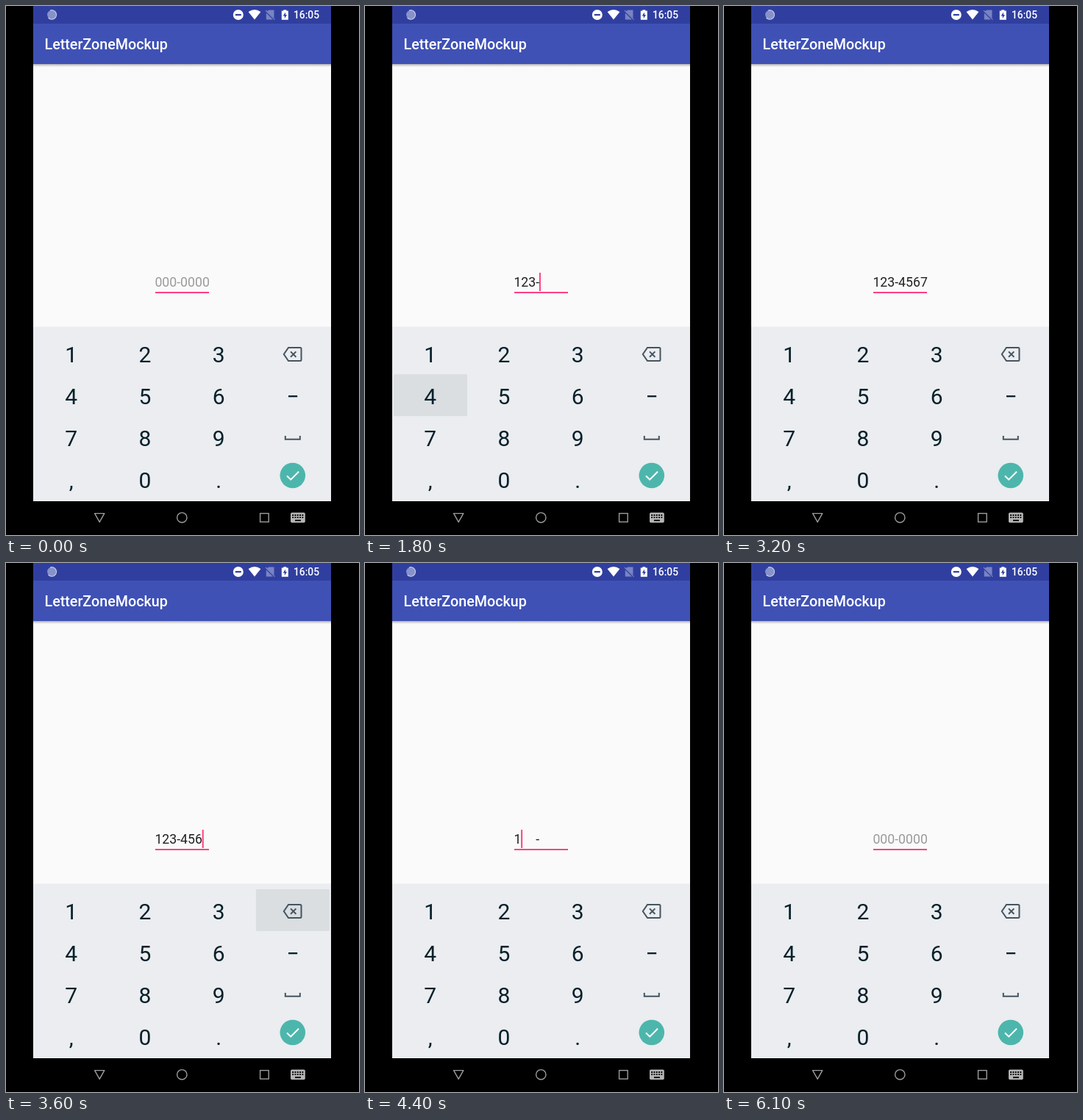
Animation of 480 by 720 pixels, one loop 6.6 s. Source, as an HTML page:

```html
<!DOCTYPE html>
<html lang="en">
<head>
<meta charset="utf-8">
<title>Postcode field</title>
<style>
  html, body { margin: 0; width: 100%; height: 100%; overflow: hidden; background: #000; }
  svg { display: block; width: 480px; height: 720px; }
  text { font-family: Roboto, "Noto Sans", sans-serif; white-space: pre; }
  .key { font-size: 30px; text-anchor: middle; fill: #06202a; }
  .field { font-size: 17.7px; }
  .line { fill: none; }
</style>
</head>
<body>
<svg viewBox="0 0 480 720">
  <defs>
    <linearGradient id="shade" x2="0" y2="1">
      <stop offset="0" stop-color="#000" stop-opacity=".28"/>
      <stop offset="1" stop-color="#000" stop-opacity="0"/>
    </linearGradient>
  </defs>
  <rect width="480" height="720"/>
  <rect x="37" width="405" height="674" fill="#fafafa"/>
  <rect x="37" y="79" width="405" height="4" fill="url(#shade)"/>
  <rect x="37" width="405" height="24.5" fill="#303f9f"/>
  <rect x="37" y="24" width="405" height="55" fill="#3f51b5"/>
  <text x="52.5" y="59" font-size="19.7" font-weight="500" fill="#fff">LetterZoneMockup</text>

  <!-- status bar -->
  <circle cx="62.3" cy="12" r="6.2" fill="#8792cb"/>
  <path class="line" d="M60 6.2A6.2 6.2 0 1 1 57.6 16" stroke="#c3c9e6" stroke-width="1.3"/>
  <circle cx="315.8" cy="12" r="7" fill="#fff"/>
  <rect x="311.8" y="10.9" width="8" height="2.2" fill="#303f9f"/>
  <path d="M338 18.6L329.6 8Q338 1.8 346.4 8Z" fill="#fff"/>
  <path d="M357.5 5.5H364.5V16.5L354 7.5ZM353.8 9.5L363 18.5H353.8Z" fill="#7984c3"/>
  <path class="line" d="M353 6L365.5 18.6" stroke="#7984c3" stroke-width="1.2"/>
  <path d="M377.3 6.5V5.2H381.3V6.5H383.8V18.8H374.8V6.5Z" fill="#fff"/>
  <path d="M380 8.4L376.7 13.4H378.8V17L382 12H380Z" fill="#303f9f"/>
  <text x="391" y="17" font-size="13.8" font-weight="500" fill="#fff">16:05</text>

  <!-- postcode field -->
  <rect x="203" y="389" width="73" height="2" fill="#ff4081"/>
  <text id="head" class="field" x="202.4" y="382.4"/>
  <text id="tail" class="field" x="232.2" y="382.4"/>
  <rect id="caret" y="363" width="2" height="25" fill="#ff4081"/>

  <!-- keypad -->
  <rect x="37" y="436.5" width="405" height="236.5" fill="#ebedf0"/>
  <rect id="press" width="100" height="57" rx="1.5" fill="#dadee1"/>
  <g id="keys"></g>
  <g class="line" stroke="#37474f" stroke-width="2">
    <path d="M384 465H400Q401.5 465 401.5 466.5V481.5Q401.5 483 400 483H384L377.8 474Z" stroke="#455560"/>
    <path d="M387 470.4L394.4 477.8M394.4 470.4L387 477.8" stroke="#455560"/>
    <path d="M384 531.2H396.2" stroke="#06202a" stroke-width="2.3"/>
    <path d="M379.8 585V589.8H399.8V585" stroke="#455560"/>
  </g>
  <circle cx="389.8" cy="639" r="17.3" fill="#4db6ac"/>
  <path class="line" d="M382 639.5L387.2 644.7L398 633.8" stroke="#fff" stroke-width="2"/>

  <!-- navigation bar -->
  <g class="line" stroke="#9c9c9c" stroke-width="1.4">
    <path d="M120.6 690.6H133.8L127.2 702.4Z" stroke-linejoin="round"/>
    <circle cx="239.3" cy="696.3" r="6.7"/>
    <rect x="345.6" y="690.6" width="11.6" height="11.6"/>
  </g>
  <rect x="387" y="689.4" width="19.8" height="13.8" rx="1.8" fill="#b5b5b5"/>
  <g class="line" stroke="#000" stroke-width="1.8">
    <path d="M389.2 693H405M389.2 696.2H405" stroke-dasharray="1.9 1.4"/>
    <path d="M393 700.2H401"/>
  </g>
</svg>
<script>
  const LOOP = 6600, DIGIT = 9.94, DASH = 4.9;
  const $ = id => document.getElementById(id);
  const head = $('head'), tail = $('tail'), caret = $('caret'), press = $('press');

  const colX = c => 39 + c * 100.3;
  const rowY = r => 444 + r * 57.2;
  $('keys').innerHTML = ['123', '456', '789', ',0.'].map((row, r) =>
    [...row].map((ch, c) =>
      `<text class="key" x="${colX(c) + 49.7}" y="${rowY(r) + 40.6}">${ch}</text>`
    ).join('')).join('');

  // [time, digits entered]
  const edits = [
    [900, 1], [1100, 2], [1400, 3], [1900, 4], [2100, 5], [2300, 6], [2700, 7],
    [3500, 6], [3700, 5], [3900, 4], [4000, 3], [4200, 2], [4400, 1], [4600, 0]
  ];
  // [time, column, row], each held for 100 ms
  const presses = [
    [800, 0, 0], [1000, 1, 0], [1300, 2, 0], [1800, 0, 1], [2000, 1, 1], [2200, 2, 1],
    [3400, 3, 0], [3600, 3, 0], [3800, 3, 0], [4100, 3, 0], [4300, 3, 0], [4500, 3, 0]
  ];

  function draw(t) {
    let since = 600, count = 0;
    for (const [at, n] of edits) if (t >= at) [since, count] = [at, n];

    const digits = count ? '1234567'.slice(0, count) : '0000000';
    head.textContent = digits.slice(0, 3);
    tail.textContent = '-' + digits.slice(3);
    const ink = count ? '#212121' : '#9b9b9b';
    head.setAttribute('fill', ink);
    tail.setAttribute('fill', ink);

    const x = 202.2 + count * DIGIT + (count > 2 ? DASH : 0);
    caret.setAttribute('x', Math.min(274.4, Math.max(203, x)));
    const lit = t >= since && (t - since) % 1000 < 500;
    caret.setAttribute('visibility', lit ? 'visible' : 'hidden');

    const held = presses.find(([at]) => t >= at && t < at + 100);
    press.setAttribute('visibility', held ? 'visible' : 'hidden');
    if (held) {
      press.setAttribute('x', colX(held[1]));
      press.setAttribute('y', rowY(held[2]));
    }
  }

  const start = performance.now();
  function tick() {
    draw((performance.now() - start) % LOOP);
    requestAnimationFrame(tick);
  }
  tick();
</script>
</body>
</html>
```
